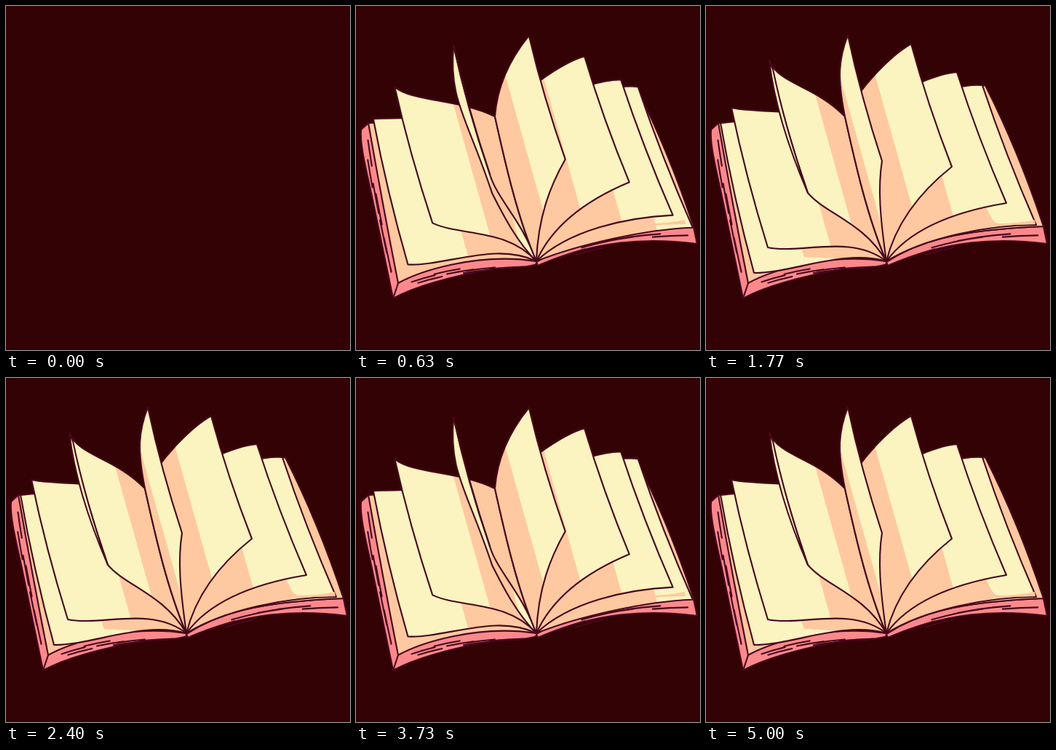
These frames come from a looping animation (473x473 px, 5.11 s). An HTML page:

```html
<!DOCTYPE html>
<html lang="en">
<head>
<meta charset="utf-8">
<title>Turning pages</title>
<style>
  html, body { margin: 0; width: 100%; height: 100%; overflow: hidden; background: #330204; }
  svg { display: block; width: 100vw; height: 100vh; }
  .line { fill: none; stroke: #47081c; stroke-width: 2.1; stroke-linejoin: round; stroke-linecap: round; }
  .cream { fill: #fcf4c0; }
  .shade { fill: #fec9a0; }
  .pink { fill: #fb898c; }
</style>
</head>
<body>
<svg viewBox="0 0 473 473"><g id="book"></g></svg>
<script>
const LOOP = 5110, FPS = 30;
const SPINE = [248, 351], ROOT = [191, 152];
const book = document.getElementById('book');

// Where the free edge of a page passes as it turns from right to left.
const tips = [[392, 111], [380, 109], [345, 91], [282, 52], [195, 40], [87, 75], [35, 140], [20, 161]];
const corners = [[468, 305], [454, 301], [413, 271], [338, 221], [242, 213], [140, 257], [85, 332], [66, 367]];

const add = (p, x, y) => [p[0] + x, p[1] + y];
const toward = (a, b, fx, fy = fx) => [a[0] + (b[0] - a[0]) * fx, a[1] + (b[1] - a[1]) * fy];
const bump = x => Math.max(0, 1 - 2 * Math.abs(x));

// Catmull-Rom position on a track; turn 0 is the second key.
function along(track, turn) {
  const i = Math.floor(turn + 1), t = turn + 1 - i;
  const key = k => track[Math.max(0, Math.min(track.length - 1, k))];
  const [a, b, c, d] = [key(i - 1), key(i), key(i + 1), key(i + 2)];
  return [0, 1].map(n => b[n] + t / 2 * (c[n] - a[n] +
    t * (2 * a[n] - 5 * b[n] + 4 * c[n] - d[n] + t * (3 * (b[n] - c[n]) + d[n] - a[n]))));
}

const shape = (d, cls) => `<path class="${cls}" d="${d}"/>`;
const inked = (d, cls) => shape(d, cls) + shape(d, 'line');

// turn runs from 0 (flat on the right) to 6 (flat on the left).
function drawPage(turn, id) {
  const side = turn / 3 - 1;
  const lift = Math.cos(side * Math.PI / 2) ** 2;
  const edgeOn = bump(turn - 3.5);
  const fan = (58 - 22 * turn) * Math.PI / 180;

  const tip = along(tips, turn), corner = along(corners, turn);
  const root = add(ROOT, -4 * edgeOn, 115 * edgeOn);
  const edge = add(toward(tip, corner, .5), -5, 0);
  const sag = add(corner, 60 * Math.sin(side * Math.PI / 2) - 6, 38 * lift);
  const rise = add(SPINE, 62 * Math.sin(fan), -62 * Math.cos(fan));
  const bow = -12 * lift - 8 * edgeOn;
  const top1 = add(toward(tip, root, .22, .3 + .4 * side), bow, 0);
  const top2 = add(toward(tip, root, .68, .52 - .25 * side), bow, 0);

  const spine = `C${toward(SPINE, root, .456, .303)} ${toward(SPINE, root, .754, .682)} ${root}`;
  const outline = `M${tip}Q${edge} ${corner}C${sag} ${rise} ${SPINE}${spine}C${top2} ${top1} ${tip}Z`;

  const shadeX = y => 392 - 45 * turn - 16 * lift + .28 * (y - 300);
  const dark = `M${shadeX(60)} 60L${shadeX(345)} 345L${SPINE}${spine}Z`;

  const curl = bump(turn - 4);
  const lip = `M${tip}Q${add(edge, -12 * curl, -10 * curl)} ${corner}Q${edge} ${add(tip, 5 * curl, 12 * curl)}Z`;

  return `<clipPath id="${id}"><path d="${outline}"/></clipPath>` +
    shape(outline, 'cream') +
    `<g clip-path="url(#${id})">${shape(dark, 'shade')}</g>` +
    shape(outline, 'line') + (curl ? inked(lip, 'cream') : '');
}

let seed = 7;
const random = () => (seed = seed * 16807 % 2147483647) / 2147483647;

// Short pen strokes following the curve a-b-c, spread over a band.
function hatch(a, b, c, spread, count) {
  const point = t => toward(toward(a, b, t), toward(b, c, t), t);
  let d = '';
  for (let i = 0; i < count; i++) {
    const from = .04 + .72 * (i + random()) / count, lane = random();
    const at = t => add(point(t), spread[0] * lane, spread[1] * lane);
    d += `M${at(from)}L${at(from + .1)}L${at(from + .2)}`;
  }
  return shape(d, 'line');
}

const cover =
  inked('M17 161L7 170C5 190 14 225 22 262L51 402C80 386 130 372 190 361Q235 360 248 355V300L60 200Z', 'pink') +
  inked('M248 352C290 325 340 308 464 303L469 327C400 318 330 322 250 357Z', 'pink') +
  inked('M17 161Q36 270 58 381C85 366 165 338 248 351L191 152Z', 'shade') +
  inked('M191 152L384 109Q430 200 464 303C340 308 290 325 248 351Z', 'shade') +
  shape('M51 402L58 381', 'line');

const strip = shape('M388 282Q394 298 402 299Q430 299 452 294L453 300Q390 301 330 310Z', 'shade');

const hatching =
  hatch([10, 178], [21, 260], [49, 385], [6, 0], 6) +
  hatch([58, 384], [130, 355], [240, 352], [0, 9], 7) +
  hatch([262, 347], [340, 308], [468, 308], [0, 13], 7);

const poses = [0, .46, .23].map((lag, k) => {
  const page = i => drawPage(i - lag, `page${k}${i}`);
  const g = document.createElementNS('http://www.w3.org/2000/svg', 'g');
  g.innerHTML = cover + page(0) + strip + [1, 2, 6, 5, 4, 3].map(page).join('') + hatching;
  book.appendChild(g);
  return g;
});

// Nine poses take 28 ticks; each pause holds the pages one tick longer.
const pauses = [121, 133, 141, 141];
function poseAt(tick) {
  const held = pauses.filter(p => p <= tick).length;
  return (Math.floor((tick - 6 - held) * 9 / 28) + 3) % 3;
}

function render(ms) {
  const tick = Math.floor(ms * FPS / 1000 + .15);
  const left = 1 - Math.min(1, Math.max(0, (tick - 1) / 15));
  book.setAttribute('opacity', 1 - left ** 2.1);
  book.setAttribute('transform', `translate(0 ${69 * left ** 1.75})`);
  const current = poseAt(tick);
  poses.forEach((g, k) => g.setAttribute('display', k === current ? 'inline' : 'none'));
}

const start = performance.now();
function loop() {
  render((performance.now() - start) % LOOP);
  requestAnimationFrame(loop);
}
render(0);
requestAnimationFrame(loop);
</script>
</body>
</html>
```
